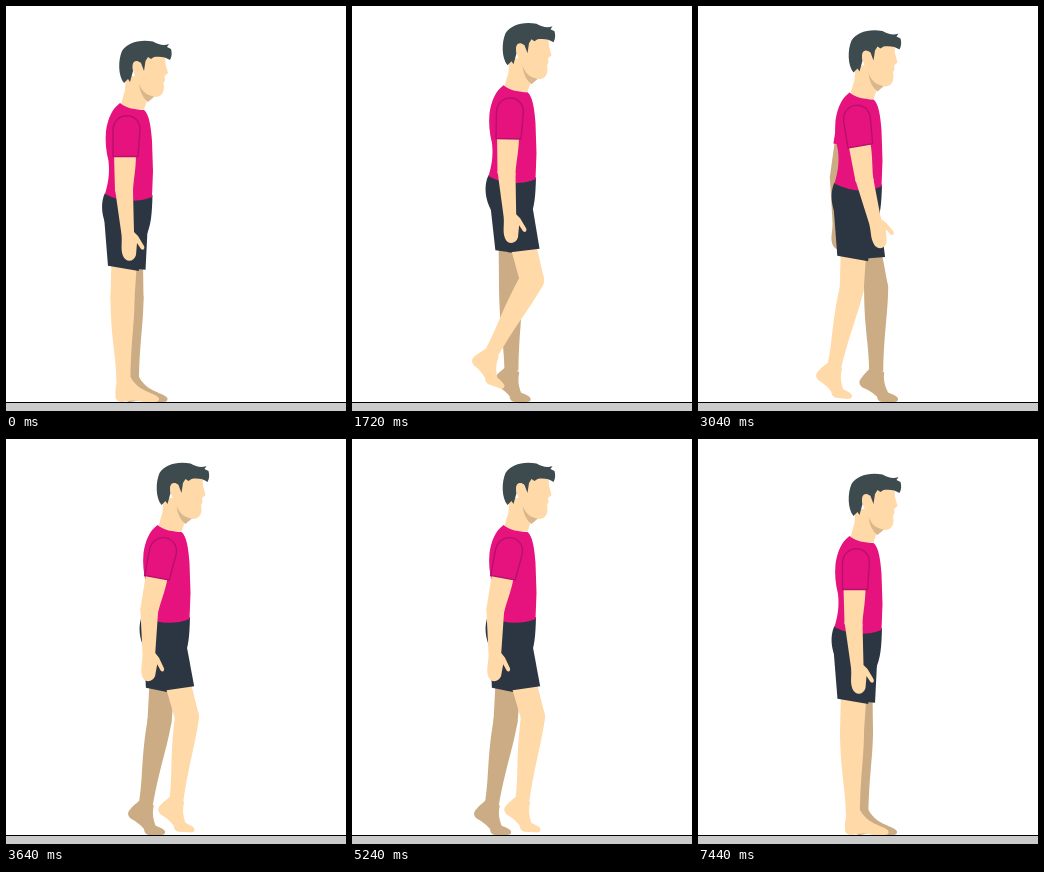
An HTML page with a canvas that plays this animation: 340 by 405 pixels, repeating every 9.2 s.

```html
<!DOCTYPE html>
<html lang="en">
<head>
<meta charset="utf-8">
<title>Tiptoe walk</title>
<style>
html, body { margin: 0; width: 100%; height: 100%; overflow: hidden; background: #fff; }
canvas { display: block; }
</style>
</head>
<body>
<canvas id="stage" width="340" height="405"></canvas>
<script>
const ctx = document.getElementById('stage').getContext('2d');
const LOOP = 9200, TICK = 40, CYCLE = 1600, RAD = Math.PI / 180;
const SKIN = '#ffd9a8', SHADE = '#ccac84', SHIRT = '#e6137f', SEAM = '#b80f6c',
      SHORTS = '#2c3642', HAIR = '#3e4b4e';

const P = d => new Path2D(d);
const shapes = {
  thigh: P('M-13 40H13L12 88A12 12 0 0 1-12 88Z'),
  shin: P('M-12 0A12 12 0 0 1 12 0C12 25 8 45 7.5 83H-6.5C-7 55-12 40-12 0Z'),
  shortLeg: P('M-23 0H20L15 60L-16 56Z'),
  foot: P('M-6.5-4C-6 4-8 8-7.5 14C-8 19-5 21-1 21Q10 18 22 21L27 12C21 9 13 6 7.5-4Z'),
  toes: P('M-1-6C8-3 14-1 14 2C14 5 11 5 8 5H-2A5.5 5.5 0 0 1-1-6Z'),
  pelvis: P('M99 187C94 197 95 215 106 228L140 230C145 220 146 208 146.5 189Q122 200 99 187Z'),
  shirt: P('M114 97C120 102 130 104 138 104C143 108 145 120 146 135L147 165L146 191Q122 200 99 188C102 178 104 168 102.5 155C100 145 99 135 100 125C102 112 106 103 114 97Z'),
  sleeve: P('M107 150.5V124C108 105 134 105 134 124L132 150.5Z'),
  upperArm: P('M108 148H130C130 165 127 175 127 187Q118 194 109 185Z'),
  foreArm: P('M109 183Q118 176 127 185L128 226L132 230L138 240C139 242 138 245 135 243L131 237L130 249C128 256 120 257 117 250C114 242 117 236 115 225Z'),
  neck: P('M120 70L119 84L115 98Q126 105 138 103.5L141 95L146 90L138 70Z'),
  chinShade: P('M133 77Q137 90 149 90L142 96Q134 90 133 77Z'),
  face: P('M132 50H159L159.5 58L162 67L158.5 70L159 74L157.5 77L158 81C158 88 154 91 149 91C140 89 134 82 131 72Z'),
  hair: P('M118 77C112 70 112 54 116 45C121 37 133 33 147 35.5C153 39 158 40 163 38L161 41L165 43C166 47 166 50 164 54C160 51 154 50 148 51L145 53L142 51L139.5 55L138 65L135 57C130 53 126 57 127 65L124 76L122 73Z'),
  ear: P('M128 67C124 57 129 53 133 56C136 61 135 70 130 73Z')
};

// One leg over a full cycle: time, knee x y, ankle x y, foot pitch
const gait = [
  [40, 178, 272, 138, 351, 50], [120, 180, 274, 139, 347, 52],
  [440, 181, 278, 170, 361, 44], [600, 180, 282, 179, 365, 36],
  [840, 165, 279, 163.5, 364.5, 42], [920, 159, 277, 159, 364.5, 42],
  [1240, 153.5, 282, 139.5, 364.5, 42], [1400, 150.5, 284, 136, 361.5, 44]
];

const clamp = u => Math.max(0, Math.min(1, u));
const ease = u => u * u * (3 - 2 * u);
const mix = (a, b, u) => a.map((v, i) => v + (b[i] - v) * u);

function key(i) {
  const n = gait.length, turn = Math.floor(i / n);
  const [t, ...v] = gait[i - turn * n];
  return { t: t + turn * CYCLE, v };
}

function legAt(t) {
  t = (t - 40 + 2 * CYCLE) % CYCLE + 40;
  let i = 0;
  while (key(i + 1).t <= t) i++;
  const [a, b, c, d] = [i - 1, i, i + 1, i + 2].map(key);
  const span = c.t - b.t, u = (t - b.t) / span;
  return b.v.map((p, k) => {
    const q = c.v[k];
    const m = (q - a.v[k]) / (c.t - a.t) * span;
    const n = (d.v[k] - p) / (d.t - b.t) * span;
    return p + u * (m + u * (3 * (q - p) - 2 * m - n + u * (2 * (p - q) + m + n)));
  });
}

// Pose: body x, body y, arm angle (positive is back), near leg (5), far leg (5)
const stand = x => [x, 0, 0,
  x + 116.5, 292, x + 117, 375, 0, x + 125.5, 292, x + 125.5, 375, 0];
const tiptoe = x => [x + 9, -9, 0,
  x + 124.5, 285, x + 127, 366, 28, x + 133.5, 285, x + 135.5, 366, 28];
const walk = t => [37.5,
  -13.7 - 4.2 * Math.cos(2 * Math.PI * (t - 155) / 800),
  11 * Math.sin(2 * Math.PI * (t - 100) / CYCLE),
  ...legAt(t), ...legAt(t + CYCLE / 2)];

// Moves between two poses with one leg lifted; leg is its index in the pose
function step(from, to, u, leg) {
  const pose = mix(from, to, ease(u)), lift = Math.sin(Math.PI * u) ** 2;
  pose[1] -= 4.3 * lift;
  pose[leg] += 9 * lift;
  pose[leg + 1] -= 5 * lift;
  pose[leg + 3] -= 10 * lift;
  pose[leg + 4] += 10 * lift;
  return pose;
}

function poseAt(t) {
  if (t < 840) return mix(stand(0), tiptoe(0), ease(clamp((t - 440) / 320)));
  if (t < 1360) return step(tiptoe(0), walk(1360), (t - 840) / 520, 8);
  if (t <= 6200) return walk(t);
  if (t < 6680) return step(walk(6200), tiptoe(37.5), (t - 6200) / 480, 3);
  return mix(tiptoe(37.5), stand(37.5), ease(clamp((t - 7120) / 320)));
}

function fill(name, color) {
  ctx.fillStyle = color;
  ctx.fill(shapes[name]);
}

function at(x, y, angle, draw) {
  ctx.save();
  ctx.translate(x, y);
  ctx.rotate(angle);
  draw();
  ctx.restore();
}

function limb(x1, y1, x2, y2, length, name, color) {
  at(x1, y1, Math.atan2(y2 - y1, x2 - x1) - Math.PI / 2, () => {
    ctx.scale(1, Math.hypot(x2 - x1, y2 - y1) / length);
    fill(name, color);
  });
}

function leg(hx, hy, [kx, ky, ax, ay, pitch], color) {
  limb(hx, hy, kx, ky, 88, 'thigh', color);
  limb(kx, ky, ax, ay, 83, 'shin', color);
  at(ax, ay, pitch * RAD, () => {
    fill('foot', color);
    const curl = Math.max(0, pitch - 42) * 2;
    at(22, 16, (curl - pitch) * RAD, () => fill('toes', color));
  });
  limb(hx, hy, kx, ky, 88, 'shortLeg', SHORTS);
}

function turnAbout(x, y, degrees) {
  ctx.translate(x, y);
  ctx.rotate(degrees * RAD);
  ctx.translate(-x, -y);
}

function arm(dx, angle, color, seam) {
  ctx.save();
  ctx.translate(dx, 0);
  turnAbout(120.5, 118, angle);
  fill('upperArm', color);
  ctx.save();
  turnAbout(118, 185, -0.5 * Math.max(0, angle));
  fill('foreArm', color);
  ctx.restore();
  fill('sleeve', SHIRT);
  if (seam) {
    ctx.strokeStyle = SEAM;
    ctx.lineWidth = 1.4;
    ctx.stroke(shapes.sleeve);
  }
  ctx.restore();
}

function draw(t) {
  const pose = poseAt(t), [x, y, swing] = pose;
  const inBody = f => at(x, y, 0, f);
  ctx.fillStyle = '#fff';
  ctx.fillRect(0, 0, 340, 405);
  ctx.fillStyle = '#cbcbcb';
  ctx.fillRect(0, 397, 340, 8);
  ctx.fillStyle = '#000';
  ctx.fillRect(0, 396, 340, 1);

  inBody(() => arm(-4, -swing * (swing < 0 ? 1 : 0.4), SHADE, false));
  leg(x + 122.5, y + 205, pose.slice(8), SHADE);
  leg(x + 120.5, y + 205, pose.slice(3, 8), SKIN);
  inBody(() => {
    fill('pelvis', SHORTS);
    fill('neck', SKIN);
    fill('shirt', SHIRT);
    fill('chinShade', '#d9b78d');
    fill('face', SKIN);
    fill('hair', HAIR);
    fill('ear', SKIN);
    arm(0, swing, SKIN, true);
  });
}

function frame(now) {
  start ??= now;
  draw(Math.floor((now - start) % LOOP / TICK) * TICK);
  requestAnimationFrame(frame);
}
let start;
draw(0);
requestAnimationFrame(frame);
</script>
</body>
</html>
```
